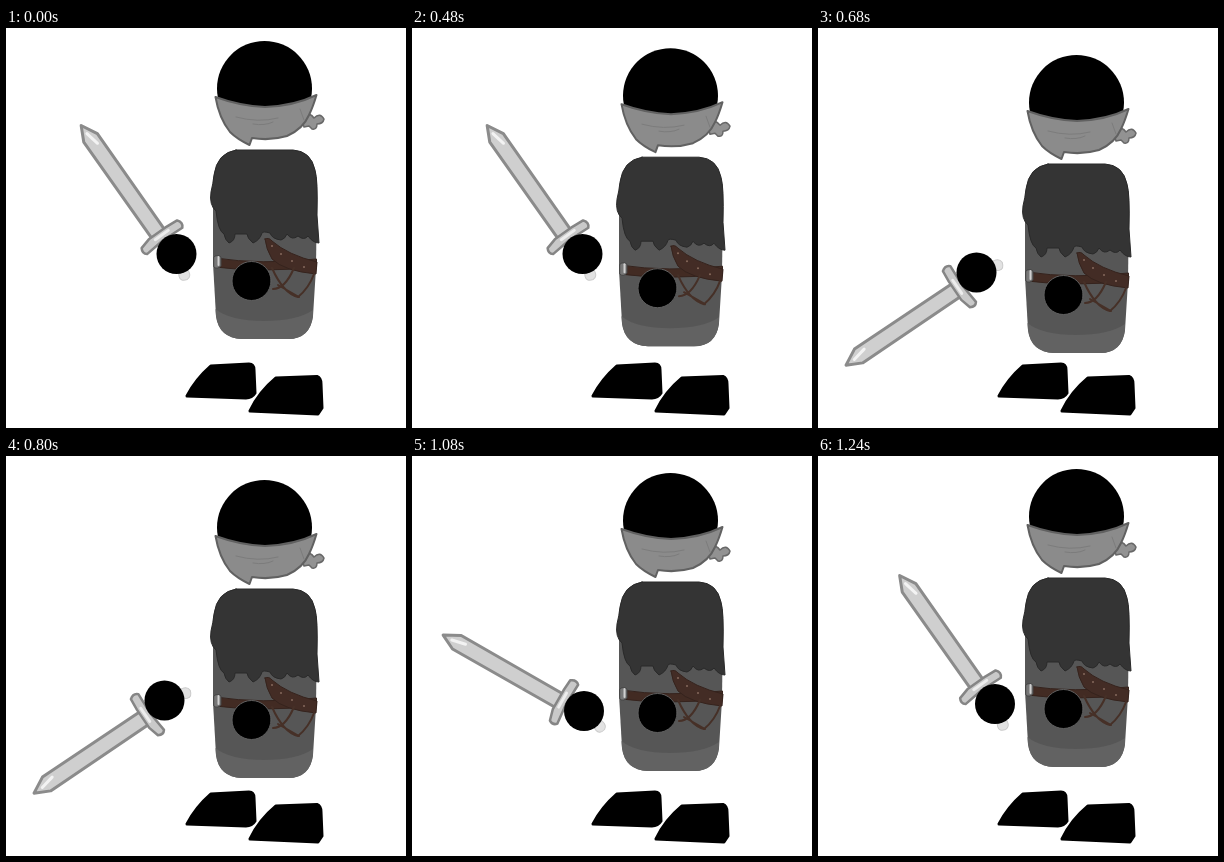
Animation of 400x400 px, one loop 1520 ms. Source, as an HTML page with a canvas:

```html
<!DOCTYPE html>
<html lang="en">
<head>
<meta charset="utf-8">
<title>Sword swing</title>
<style>
html, body { margin: 0; width: 100%; height: 100%; overflow: hidden; background: #fff; }
canvas { display: block; }
</style>
</head>
<body>
<canvas id="stage" width="400" height="400"></canvas>
<script>
const ctx = document.getElementById('stage').getContext('2d');
const STEP = 40, STEPS = 38;

// Each key: step, values...
const bob = [[0, 0], [6, 0], [12, 7.2], [13, 7.2], [17, 14], [31, 0], [38, 0]];
// step, hand x, hand y, angle in degrees
const swing = [
  [0, 170.5, 226, 54.5], [13, 170.5, 226, 54.5], [17, 158.5, 244.5, -34.3],
  [20, 158.5, 244.5, -34.3], [23, 165.5, 253.5, -9.5], [27, 172, 255, 29.4],
  [31, 177, 248, 54.5], [38, 177, 248, 54.5]
];

function sample(keys, s) {
  let i = 0;
  while (i < keys.length - 2 && s >= keys[i + 1][0]) i++;
  const a = keys[i], b = keys[i + 1], k = (s - a[0]) / (b[0] - a[0]);
  return a.slice(1).map((v, n) => v + (b[n + 1] - v) * k);
}

function paint(d, fill, line, width = 2) {
  const p = new Path2D(d);
  if (fill) { ctx.fillStyle = fill; ctx.fill(p); }
  if (line) { ctx.strokeStyle = line; ctx.lineWidth = width; ctx.stroke(p); }
}

function disc(x, y, r, fill, line) {
  ctx.beginPath();
  ctx.arc(x, y, r, 0, Math.PI * 2);
  ctx.fillStyle = fill;
  ctx.fill();
  if (line) { ctx.strokeStyle = line; ctx.lineWidth = 1; ctx.stroke(); }
}

function head() {
  disc(258.5, 60.5, 47.5, '#000');
  paint('M296 92 L301 85 Q306 87 308 90 Q314 84 318 91 Q317 96 311 96 Q311 102 306 101 L303 98 L298 99 Z', '#929292', '#686868', 1.5);
  paint('M209.5 69 Q234 78 259 79 Q288 78 310.5 67 Q307 79 303 87 Q297 101 281 108 Q264 113 246 110 L243.5 117 Q231 111 224 104 Q213 90 209.5 69 Z', '#8b8b8b', '#616161', 2);
  paint('M230 89 Q252 95 272 90 M247 96 Q259 98 267 94 M294 81 L298 92', null, '#7c7c7c', 1);
}

function torso() {
  paint('M232 123 H288 Q310 125 311 158 L310 240 L307 288 Q304 311 282 311 H236 Q213 310 210 288 L207 235 V158 Q207 127 232 123 Z', '#565656');
  paint('M209.5 281 Q224 293 258 293 Q291 293 307 282 L307 288 Q304 311 282 311 H236 Q213 310 210 288 Z', '#626262');

  paint('M209 230 Q255 237 310.5 231 V239 Q255 245 209 239 Z', '#422b23', '#35231d', 1);
  paint('M259 211 Q263 209 266 213 Q282 227 311 234 L310 246 Q278 243 266 231 Q260 221 259 211 Z', '#432c25', '#35231d', 1);
  paint('M266 240 Q277 265 292 269 Q303 260 308 246 M267 261 Q279 261 288 240 M272 257 L293 269', null, '#463027', 2);
  for (const [x, y] of [[266, 218], [275, 226], [286, 233], [298, 239]]) disc(x, y, 1, '#85695c');
  paint('M208 229 Q211 226 215 229 V238 Q211 242 208 239 Z', '#777', '#444', 1);
  paint('M212.5 229 V237', null, '#d0d0d0', 2);

  paint('M230 122 H287 Q305 123 309 142 Q312 152 311 187 L313 215 Q307 215 302 208 Q298 213 292 208 Q286 213 281 206 Q279 211 275 212 Q266 211 264 205 Q257 203 256 205 Q254 212 247 215 Q241 210 241 206 L229 206 Q229 213 223 215 Q219 212 218 206 Q212 203 210 183 Q203 177 205 164 Q207 156 208 147 Q211 125 230 122 Z', '#343434', '#292929', 1);
  disc(245.5, 253, 19.5, '#000', '#606060');
}

function feet() {
  paint('M181 368 Q190 351 205 338 L243 336 Q248 336 248 342 L249 365 Q246 370 240 370 Z', '#000', '#000', 3);
  paint('M244 383 Q253 364 270 350 L311 348.5 Q315 350 315 356 L316 380 L312 386 Z', '#000', '#000', 3);
}

// Drawn around the hand, with the blade pointing left.
function sword(x, y, deg) {
  ctx.save();
  ctx.translate(x, y);
  ctx.rotate(deg * Math.PI / 180);
  paint('M14 0 H21 Q27 1 27 6 Q25 13 20 11 L14 8 Z', '#e2e2e2', '#cacaca', 1);
  paint('M-160 3 L-144 -5.5 L-24 -4.5 V11 L-145 10.5 Z', '#cfcfcf', '#8b8b8b', 3);
  paint('M-150 3 L-136 0', null, '#f3f3f3', 3);
  paint('M-27 -20 Q-22 -24 -18 -20 L-19 3 L-17 24 Q-20 28 -25 25 L-28 14 V-8 Z', '#c9c9c9', '#858585', 2.5);
  paint('M-24 -7 V9', null, '#ededed', 3);
  ctx.restore();
  disc(x, y, 20, '#000');
}

function draw(now) {
  const s = Math.floor(now / STEP) % STEPS;
  ctx.fillStyle = '#fff';
  ctx.fillRect(0, 0, 400, 400);
  feet();
  ctx.save();
  ctx.translate(0, sample(bob, s)[0]);
  torso();
  head();
  ctx.restore();
  sword(...sample(swing, s));
}

ctx.lineJoin = ctx.lineCap = 'round';
const start = performance.now();
function tick() {
  draw(performance.now() - start);
  requestAnimationFrame(tick);
}
tick();
</script>
</body>
</html>
```
